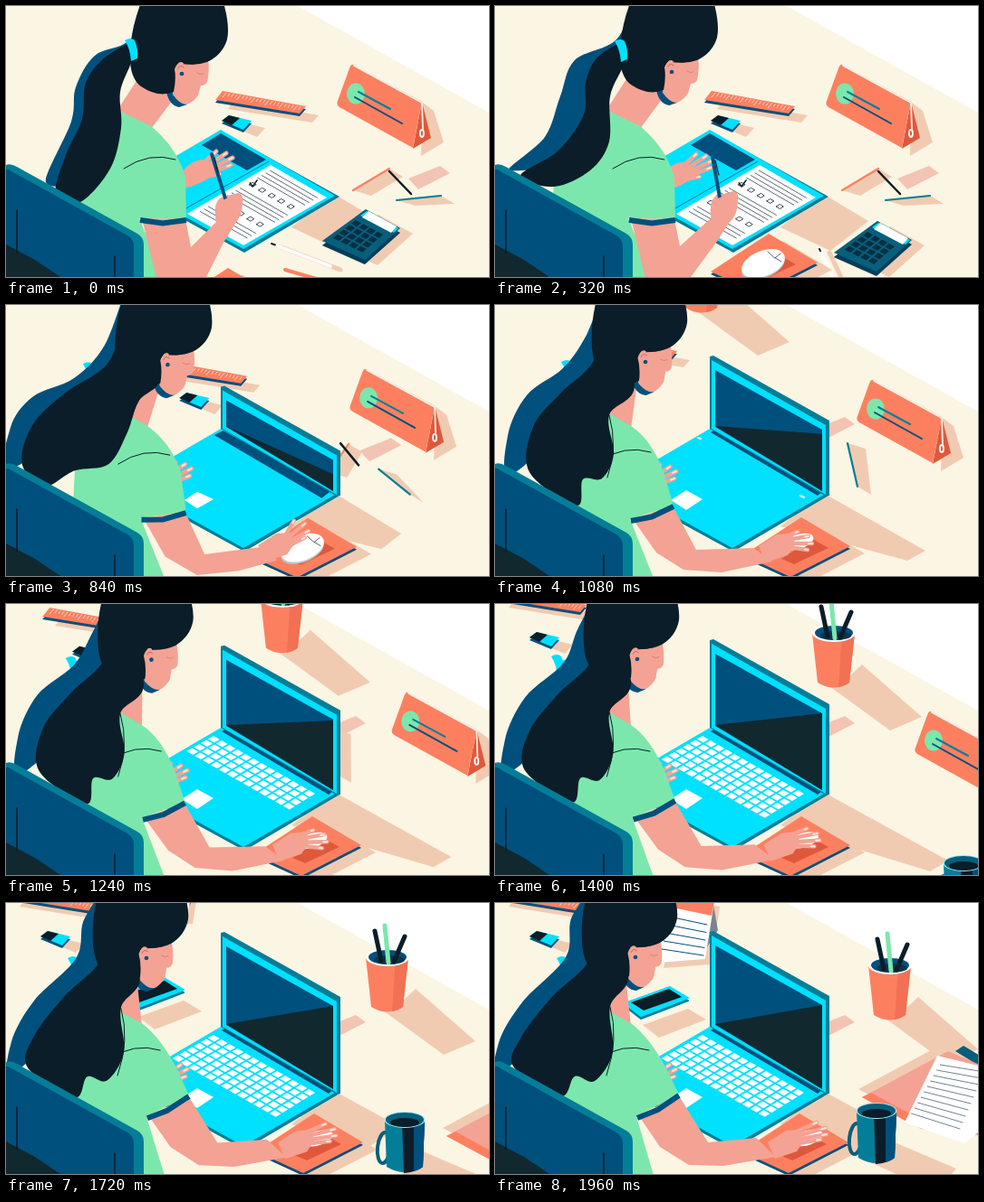
An HTML page with a canvas for the animation above (2000 ms loop, 533 by 300 pixels).

```html
<!DOCTYPE html>
<html lang="en">
<head>
<meta charset="utf-8">
<title>Study desk</title>
<style>
html, body { margin: 0; width: 100%; height: 100%; overflow: hidden; background: #fff; }
canvas { display: block; width: 533px; height: 300px; }
</style>
</head>
<body>
<canvas id="c" width="533" height="300"></canvas>
<script>
const g = document.getElementById('c').getContext('2d');
const LOOP = 2000, STEP = 40;
const ALL = [0, 320, 640, 1080, 1400, 1720, 1960];
const HELD = ALL.slice(1), FEW = [...ALL.slice(0, 4), ALL[6]], FEWHELD = FEW.slice(1);
const CREAM = '#fbf5e3', TAN = '#f1cbb1', ORANGE = '#fc8060', RUST = '#df583c',
  SKIN = '#f4a294', GREEN = '#7ce7ac', INK = '#0a1d28', BLUE = '#00507d',
  TEAL = '#047d98', CYAN = '#00e0ff', WHITE = '#fff', DARK = '#11282f', SLATE = '#075f7b';
let t = 0;

// Monotone cubic through key poses; the last row repeats if rows run out.
function at(rows, keys = ALL) {
  const row = i => rows[Math.min(i, rows.length - 1)], last = keys.length - 1;
  let i = 0;
  while (i < last - 1 && t >= keys[i + 1]) i++;
  const h = keys[i + 1] - keys[i], u = Math.max(0, Math.min(1, (t - keys[i]) / h)), v = 1 - u;
  const slope = (k, n) => (row(k + 1)[n] - row(k)[n]) / (keys[k + 1] - keys[k]);
  const tangent = (k, n) => {
    if (k < 1 || k >= last) return 0;
    const a = slope(k - 1, n), b = slope(k, n);
    return a * b > 0 ? 2 * a * b / (a + b) : 0;
  };
  return row(i).map((a, n) => a * (1 + 2 * u) * v * v + row(i + 1)[n] * u * u * (3 - 2 * u)
    + h * (tangent(i, n) * u * v * v - tangent(i + 1, n) * u * u * v));
}

function trace(p) {
  g.beginPath();
  for (let i = 0; i < p.length; i += 2) g.lineTo(p[i], p[i + 1]);
}

function poly(p, color) {
  trace(p);
  g.fillStyle = color;
  g.fill();
}

const shift = (p, dx, dy) => p.map((v, i) => v + (i % 2 ? dy : dx));
const shade = (p, dx, dy) => poly(shift(p, dx, dy), TAN);

function smooth(p, color) {
  const n = p.length / 2, P = i => [p[(i + n) % n * 2], p[(i + n) % n * 2 + 1]];
  g.beginPath();
  g.moveTo(p[0], p[1]);
  for (let i = 0; i < n; i++) {
    const [a, b, c, d] = [P(i - 1), P(i), P(i + 1), P(i + 2)];
    g.bezierCurveTo(b[0] + (c[0] - a[0]) / 6, b[1] + (c[1] - a[1]) / 6,
      c[0] - (d[0] - b[0]) / 6, c[1] - (d[1] - b[1]) / 6, c[0], c[1]);
  }
  g.fillStyle = color;
  g.fill();
}

function line(p, color, w = 1, cap = 'round') {
  trace(p);
  g.strokeStyle = color;
  g.lineWidth = w;
  g.lineCap = cap;
  g.lineJoin = 'round';
  g.stroke();
}

function path(d, color, w) {
  const p = new Path2D(d);
  if (!w) { g.fillStyle = color; g.fill(p); return; }
  g.strokeStyle = color;
  g.lineWidth = w;
  g.lineCap = 'round';
  g.stroke(p);
}

function oval(x, y, rx, ry, color, rot = 0, w = 0) {
  g.beginPath();
  g.ellipse(x, y, rx, ry, rot, 0, 7);
  g.fillStyle = g.strokeStyle = color;
  g.lineWidth = w;
  w ? g.stroke() : g.fill();
}

function moved(rows, keys, draw) {
  g.save();
  g.translate(...at(rows, keys));
  draw();
  g.restore();
}

function enter(from, rows, draw) {
  if (t >= ALL[from]) moved(rows, ALL.slice(from), draw);
}

// Point inside a quad: top-left, top-right, bottom-right, bottom-left.
const inQuad = (q, u, v) => [0, 1].map(k =>
  (q[k] * (1 - u) + q[2 + k] * u) * (1 - v) + (q[6 + k] * (1 - u) + q[4 + k] * u) * v);

function grid(q, cols, rows, fill, color, shown = rows) {
  for (let r = 0; r < Math.min(rows, shown); r++)
    for (let c = 0; c < cols; c++) {
      const at = (a, b) => inQuad(q, (c + a) / cols, (r + b) / rows);
      poly([...at(0, 0), ...at(fill, 0), ...at(fill, fill), ...at(0, fill)], color);
    }
}

function ruler() {
  const body = [239, 94, 331, 111, 324, 119, 231, 104];
  shade(body, 14, 10);
  poly(shift(body, 0, 3), BLUE);
  poly(body, ORANGE);
  for (let i = 0; i < 22; i++) {
    const x = 243 + i * 3.9, y = 96 + i * .73, n = i % 4 ? 2 : 4;
    line([x, y, x - n, y + n + 1], '#ffe9dd', .8);
  }
}

function eraser() {
  const body = [246, 121, 271, 127, 262, 137, 238, 127];
  shade(body, 15, 8);
  poly(shift(body, 0, 3), BLUE);
  poly(body, CYAN);
  poly([246, 121, 258, 124, 249, 132, 238, 127], INK);
}

function pencilCase() {
  poly([460, 107, 472, 116, 483, 151, 458, 166], TAN);
  poly([459, 106, 469, 146, 449, 158], RUST);
  path('M383 65L459 106L449 157L368 112Q364 109 366 105L379 69Q381 64 383 65Z', ORANGE);
  line([384, 66, 459, 107, 460, 136], '#fff0e8', 1.8);
  oval(386, 97, 10, 11.5, GREEN);
  line([389, 95, 424, 114], TEAL, 2);
  line([385, 101, 437, 130], BLUE, 2);
  oval(459, 141, 2, 4, WHITE, 0, 1.8);
}

function calculator() {
  const body = [397, 225, 435, 246, 396, 281, 349, 260];
  shade(body, 14, 6);
  shade(body, -1, 5);
  poly(shift(body, 0, 5), '#003d5c');
  poly(body, SLATE);
  poly([398, 227, 433, 246, 428, 251, 391, 232], CYAN);
  poly([400, 227, 431, 244, 425, 251, 393, 234], WHITE);
  grid([386, 237, 418, 254, 394, 275, 359, 258], 4, 4, .75, '#062f43');
}

function pencils() {
  const o = at([[383, 204, 423, 180], [376, 204, 407, 169], [335, 160, 350, 140]], HELD);
  const b = at([[423, 183, 447, 208], [407, 175, 431, 196], [330, 130, 345, 160]], HELD);
  const c = at([[431, 215, 480, 210], [423, 202, 471, 213], [389, 153, 400, 201], [340, 130, 345, 180]], HELD);
  const rod = (p, color) => {
    shade([...p, p[2] + 15, p[3] + 9, p[0] + 20, p[1] + 6], 0, 0);
    line(p, color, 2.2);
  };
  poly(shift([0, 0, 35, -14, 46, -6, 11, 12], b[0] + 21, b[1] + 8), '#f3c4b3');
  rod(o, ORANGE);
  rod(c, TEAL);
  line(b, INK, 2.5);
}

function cup() {
  poly([10, 55, 31, 35, 97, 93, 62, 108, -5, 59], TAN);
  path('M-24 0L-18 55Q0 66 17 55L23 0Z', ORANGE);
  path('M9 0L23 0L17 55Q12 59 5 60Z', '#f27053');
  oval(0, 0, 24, 10, WHITE);
  oval(0, 0, 21, 8, BLUE);
  oval(2, 3, 17, 5, '#0b3349');
  line([-14, -29, -7, 4], INK, 5);
  line([-3, -35, 1, 6], GREEN, 5);
  line([19, -23, 7, 5], INK, 5);
}

function mug() {
  poly([20, 35, 88, 64, 66, 90, -5, 58], TAN);
  oval(-23, 31, 7, 17, SLATE, .1, 4);
  path('M-22 0L-20 52Q0 64 20 52L22 0Z', TEAL);
  path('M-3 0L-1 59Q12 58 20 52L22 0Z', INK);
  path('M10 0L10 57Q17 55 20 52L22 0Z', BLUE);
  oval(0, 0, 22.5, 9, '#9be7ef');
  oval(0, 0, 21, 8, SLATE);
  oval(0, 3, 16, 5, INK);
}

function papers() {
  const folder = [405, 215, 500, 164, 560, 190, 560, 260, 470, 250];
  shade(folder, -4, -9);
  poly([517, 158, 550, 178, 550, 190, 508, 164], SLATE);
  poly(folder, SKIN);
  poly([405, 215, 415, 210, 470, 240, 462, 246], ORANGE);
  poly([488, 169, 550, 184, 550, 240, 518, 266, 452, 243], WHITE);
  for (let i = 0; i < 10; i++)
    line([491 - i * 3.5, 179 + i * 6, 540 - i * 3, 187 + i * 7], '#4d6470', .8);
}

function phone() {
  const body = [143, 111, 193, 93, 213, 105, 161, 125];
  shade(body, 20, 24);
  const rim = (p, color) => { poly(p, color); line([...p, p[0], p[1]], color, 2); };
  rim(shift(body, 0, 3), TEAL);
  rim(body, CYAN);
  poly([150, 110, 192, 95, 206, 104, 164, 119], INK);
}

function calendar() {
  const sheet = [196, -8, 242, -2, 232, 62, 180, 66];
  shade(sheet, 6, 6);
  poly([240, -4, 246, 30, 232, 52], '#7a8590');
  poly(sheet, WHITE);
  poly([196, -8, 242, -2, 239, 14, 191, 4], ORANGE);
  for (let i = 0; i < 5; i++) line([192 - i * 2, 15 + i * 9, 234 - i, 24 + i * 8.5], BLUE);
}

function desk() {
  poly([0, 0, 322, 0, 533, 118, 533, 300, 0, 300], CREAM);
  const s = at([[412, 238, 370, 271], [414, 241, 385, 264], [475, 272, 455, 283],
    [500, 284, 480, 296], [435, 248, 400, 270]], HELD);
  poly([362, 208, ...s, 315, 245], TAN);
}

function notePage() {
  if (t > 780) return;
  const q = at([[292, 176, 354, 212, 262, 265, 200, 230], [275, 185, 352, 209, 312, 240, 246, 205],
    [310, 180, 350, 206, 350, 208, 310, 182]], HELD);
  poly(q, WHITE);
  const bars = (v, n) => {
    for (let i = 0; i < n; i++, v += .05)
      line([...inQuad(q, .08, v), ...inQuad(q, .92, v)], '#4b5d69', .9);
  };
  const boxes = v => {
    for (let i = 0; i < 5; i++) {
      const [x, y] = inQuad(q, .14 + i * .17, v);
      line([x - 4, y, x, y - 2.5, x + 4, y, x, y + 2.5, x - 4, y], INK, .8);
    }
  };
  bars(.06, 4);
  boxes(.31);
  if (t < 520) {
    bars(.42, 4);
    boxes(.68);
    bars(.8, 3);
    const [x, y] = inQuad(q, .14, .31);
    line([x - 3, y - 2, x, y + 2, x + 5, y - 5], INK, 1.4);
  } else line([...inQuad(q, 0, .9), ...inQuad(q, .75, .9)], BLUE, 7, 'butt');
}

function computer() {
  const [h] = at([[0], [19], [80], [97], [104], [105]], HELD);
  poly([150, 190, 237, 138, 368, 211, 263, 273, 150, 211], TEAL);
  poly([150, 188, 237, 137, 363, 210, 262, 269, 150, 207], CYAN);
  poly(at([[216, 154, 237, 141, 287, 170, 266, 182], [221, 148, 237, 140, 352, 205, 334, 216],
    [238, 141, 243, 138, 362, 206, 356, 211]], HELD), BLUE);
  if (t < 760) line(at([[197, 225, 290, 172], [200, 230, 255, 198], [190, 232, 200, 227]], HELD), TEAL);
  notePage();
  if (t > 540) {
    const s = Math.min(1, (t - 540) / 360);
    poly([211 - 17 * s, 216, 211, 216 - 11 * s, 229, 215, 211, 216 + 11 * s], WHITE);
  }
  if (t > 1080) grid([229, 146, 343, 211, 298, 239, 182, 173], 13, 6, .78, WHITE, Math.ceil((t - 1080) / 45));
  else if (t > 900) {
    line([224, 147, 227, 148], WHITE, 2);
    line([337, 211, 341, 213], WHITE, 2);
  }
  if (h < 1) return;
  poly([237, 137, 237, 137 - h, 241, 136 - h, 369, 208 - h, 369, 211, 364, 211], TEAL);
  poly([239, 137, 239, 141 - Math.max(h, 5), 365, 213 - Math.max(h, 4), 365, 210], h < 25 ? '#00a9c8' : CYAN);
  if (h < 25) return;
  const edge = Math.min(206, 214 - h);
  poly([243, 135, 243, 152 - h, 361, 218 - h, 361, 206], BLUE);
  poly([243, 134, 361, Math.max(edge + (h < 97 ? (97 - h) / 3 : 0) + 3, 218 - h), 361, 206], DARK);
}

function mat() {
  moved([[245, 290], [302, 252], [325, 237], [338, 235], [338, 235], [340, 233], [336, 233]], ALL, () => {
    const pad = [0, 0, 54, 32, -12, 66, -64, 42];
    shade(pad, 16, 8);
    poly(shift(pad, 0, 3), BLUE);
    poly(pad, ORANGE);
    poly([-22, 46, 12, 24, 30, 34, -8, 52], RUST);
    if (t < 960) {
      oval(-6, 36, 25, 13, '#b9c5cb', -.38);
      oval(-6, 33, 25, 14, WHITE, -.38);
      path('M-1 20Q4 26 14 31M7 27L13 22', '#40545f', .9);
    }
  });
}

function strayPencils() {
  if (t >= 640) return;
  const w = at([[293, 263, 358, 288], [358, 269, 375, 305], [375, 320, 390, 350]]);
  line(shift(w, 11, 4), TAN, 5);
  line(w, WHITE, 4);
  line([w[0], w[1], w[0] + (w[2] - w[0]) * .06, w[1] + (w[3] - w[1]) * .06], INK, 2);
  line(at([[308, 292, 346, 303], [350, 315, 390, 330]]), ORANGE, 4);
}

function finger(x, y, x2, y2, w = 5) {
  line([x, y, x2, y2], SKIN, w);
  line([x + (x2 - x) * .85, y + (y2 - y) * .85, x2, y2], '#ffe4dd', 2);
}

function leftHand() {
  moved([[0, 0], [-10, 3], [-37, 9], [-50, 16]], ALL, () => {
    path('M185 203Q196 172 216 170Q232 172 232 184Q218 197 196 202Z', SKIN);
    finger(216, 176, 232, 161);
    finger(222, 177, 243, 163);
    finger(224, 181, 250, 168);
    finger(222, 186, 248, 176);
    finger(216, 190, 236, 186, 4);
  });
}

function onHead([x, y], tilt, draw) {
  g.save();
  g.translate(x, y);
  g.rotate(tilt);
  draw();
  g.restore();
}

function neckAndFace(ear, tilt, s) {
  const [x, y] = ear;
  poly([x - 50, y + 8, x, y + 10, x - 10, y + 29, s[2], s[3] + 3, s[0], s[1] + 4], SKIN);
  onHead(ear, tilt, () => {
    path('M-17 20Q-14 35 -3 37L6 34L-2 18Z', BLUE);
    path('M-10 -14L29 -17Q31 -4 28 9Q26 13 21 13L19 20Q19 26 8 33Q0 37 -10 23Z', SKIN);
    path('M17 -1Q21 2 24 0', '#cf7b70', .8);
  });
}

function hairCap(ear, tilt) {
  onHead(ear, tilt, () => {
    path('M-2 -12Q14 -8 28 -13Q45 -21 50 -38Q54 -56 42 -92L-40 -92Q-54 -58 -56 -35Q-61 2 -45 14Q-26 27 -9 20Q-6 6 -8 -5Q-6 -11 -2 -12Z', INK);
    oval(-1, -5, 5, 8, SKIN);
    path('M-4 -6Q-2 -11 2 -7', '#b9655e', .9);
    path('M2 -11Q24 -8 40 -24', INK, .8);
    oval(0, 0, 2.3, 2.3, BLUE);
  });
}

function tie() {
  moved([[138, 47], [139, 48], [105, 75], [80, 72], [69, 67], [75, 70]], ALL, () =>
    path('M-7 -9Q0 -13 4 -9Q8 0 7 11L0 14Q-1 0 -7 -9Z', CYAN));
}

function rightArm(s) {
  const a = at([
    [204, 267, 232, 239, 256, 236, 240, 262, 221, 300, 168, 310],
    [204, 266, 237, 236, 262, 234, 244, 262, 216, 300, 168, 310],
    [216, 279, 274, 266, 290, 279, 262, 291, 214, 303, 173, 285],
    [222, 271, 285, 269, 306, 284, 250, 296, 208, 293, 178, 274],
    [235, 265, 288, 260, 310, 281, 252, 291, 214, 290, 182, 270]], FEW);
  poly([s[10] + 3, s[11], s[8] - 1, s[9], ...a], SKIN);
  const [x, y] = at([[247, 222], [254, 220], [286, 262], [315, 265], [325, 263]], FEW);
  if (t < 480) {
    const p = at([[227, 164, 242, 213], [240, 167, 248, 212], [262, 185, 270, 228]]);
    g.save();
    g.translate(x, y);
    path('M-15 18Q-19 -4 -10 -10L9 -15Q16 -14 14 -4Q14 12 4 20Z', SKIN);
    g.restore();
    line(p, BLUE, 4);
    line([p[0] + 3, p[1] + 4, p[0] + 7, p[1] + 20], INK, 1.2);
    line([x - 10, y - 3, x + 9, y - 11], SKIN, 6);
    return;
  }
  if (t > 860) oval(x + 20, y - 3, 17, 8, WHITE, -.3);
  const tips = at([[14, -34, 26, -32, 30, -24, 26, -16], [19, -14, 31, -9, 35, -1, 30, 6],
    [30, -20, 40, -14, 41, -7, 34, -1]], FEW.slice(2));
  poly([x - 24, y + 2, x - 4, y - 11, x + 13, y - 12, x + 16, y, x + 8, y + 12, x - 16, y + 20], SKIN);
  for (let i = 0; i < 4; i++)
    finger(x + 6 + i, y - 9 + i * 4, x + tips[i * 2], y + tips[i * 2 + 1], 4.5);
}

function woman() {
  const ear = at([[194, 75], [195, 73], [188, 69], [166, 63], [157, 61], [155, 61], [155, 60]]);
  const [tilt] = at([[0], [0], [0], [-.1]]);
  // Collar, shoulder, sleeve, hem, then the back.
  const s = at([
    [121, 114, 160, 133, 188, 156, 198, 189, 199, 236, 147, 235, 65, 192, 72, 130],
    [130, 116, 160, 133, 188, 155, 198, 185, 200, 234, 148, 235, 62, 220, 58, 180],
    [126, 120, 150, 134, 173, 149, 186, 185, 197, 222, 149, 237, 90, 215, 100, 180],
    [126, 120, 150, 133, 171, 149, 190, 185, 203, 212, 156, 236, 72, 212, 88, 180]], FEWHELD);
  const back = at([
    [165, -20, 138, 36, 98, 55, 77, 90, 72, 128, 44, 195, 90, 170],
    [160, -20, 135, 36, 88, 60, 72, 100, 55, 145, 16, 182, 100, 150],
    [145, -20, 118, 50, 75, 88, 25, 103, -2, 130, -5, 178, 110, 100],
    [125, -20, 100, 35, 75, 70, 35, 100, 14, 145, 20, 187, 110, 90],
    [118, -20, 85, 15, 78, 60, 30, 110, 4, 155, 8, 187, 100, 90]], FEW);
  const mane = at([
    [138, 42, 108, 58, 88, 85, 84, 125, 66, 165, 55, 208, 82, 217, 115, 180, 127, 135, 126, 95, 138, 62],
    [139, 42, 112, 58, 100, 85, 98, 120, 70, 160, 28, 188, 65, 200, 105, 182, 126, 150, 127, 100, 142, 64],
    [150, 30, 112, 70, 60, 97, 20, 130, 2, 165, 5, 185, 60, 176, 108, 165, 135, 125, 162, 95, 180, 70],
    [122, 0, 110, 60, 72, 98, 42, 135, 38, 185, 90, 222, 97, 193, 118, 192, 131, 165, 126, 122, 154, 88],
    [110, 0, 106, 60, 62, 105, 28, 150, 21, 182, 72, 214, 88, 192, 110, 197, 130, 165, 127, 115, 147, 78]], FEW);

  if (t >= 520) tie();
  neckAndFace(ear, tilt, s);
  path(`M${s[0]} ${s[1]}L${s[2]} ${s[3]}Q${s[4]} ${s[5]} ${s[6]} ${s[7]}L${s[8]} ${s[9]}L${s[10]} ${s[11]}L176 305L60 305L${s[12]} ${s[13]}L${s[14]} ${s[15]}Z`, GREEN);
  path(`M${s[4] - 58} ${s[5] + 24}Q${s[4] - 30} ${s[5] + 5} ${s[4] - 1} ${s[5] + 14}`, INK, 1);
  smooth(back, BLUE);
  smooth(mane, INK);
  if (t > 860) path(`M${mane[18]} ${mane[19]}Q${mane[18] + 10} ${mane[19] + 35} ${mane[16] - 7} ${mane[17] + 26}`, INK, 1);
  hairCap(ear, tilt);
  if (t < 520) tie();
  rightArm(s);
  line([s[10] + 1, s[11] + 2, (s[8] + s[10]) / 2, (s[9] + s[11]) / 2 + 5, s[8], s[9] + 1], BLUE, 6, 'butt');
}

function chair() {
  path('M0 176Q5 174 12 178L145 252Q152 256 152 264L152 300L0 300Z', TEAL);
  path('M0 181Q2 180 6 183L134 254Q141 258 141 266L141 300L0 300Z', BLUE);
  poly([0, 264, 32, 281, 60, 300, 0, 300], DARK);
  line([12, 226, 12, 273], INK, 1.5);
  line([120, 277, 120, 300], INK, 1.5);
}

function draw() {
  g.fillStyle = WHITE;
  g.fillRect(0, 0, 533, 300);
  desk();
  moved([[0, 0], [-26, -15], [-130, -60], [-230, -110]], HELD, ruler);
  moved([[0, 0], [-13, -9], [-110, -50], [-200, -90]], HELD, eraser);
  moved([[0, 0], [5, 1], [34, 18], [98, 54], [195, 108], [230, 120]], HELD, pencilCase);
  pencils();
  enter(2, [[120, -140], [228, -52], [374, 32], [421, 60], [436, 69]], cup);
  enter(4, [[-85, -95], [-32, -45], [0, 0]], calendar);
  enter(4, [[-72, -46], [-17, -9], [0, 0]], phone);
  enter(4, [[220, 118], [81, 43], [0, 0]], papers);
  moved([[0, 0], [25, 13], [103, 58], [300, 160]], ALL, calculator);
  computer();
  strayPencils();
  mat();
  enter(3, [[640, 360], [517, 287], [440, 240], [421, 230]], mug);
  leftHand();
  woman();
  chair();
}

const start = performance.now();
function tick() {
  t = Math.floor((performance.now() - start) % LOOP / STEP) * STEP;
  draw();
  requestAnimationFrame(tick);
}
tick();
</script>
</body>
</html>
```
